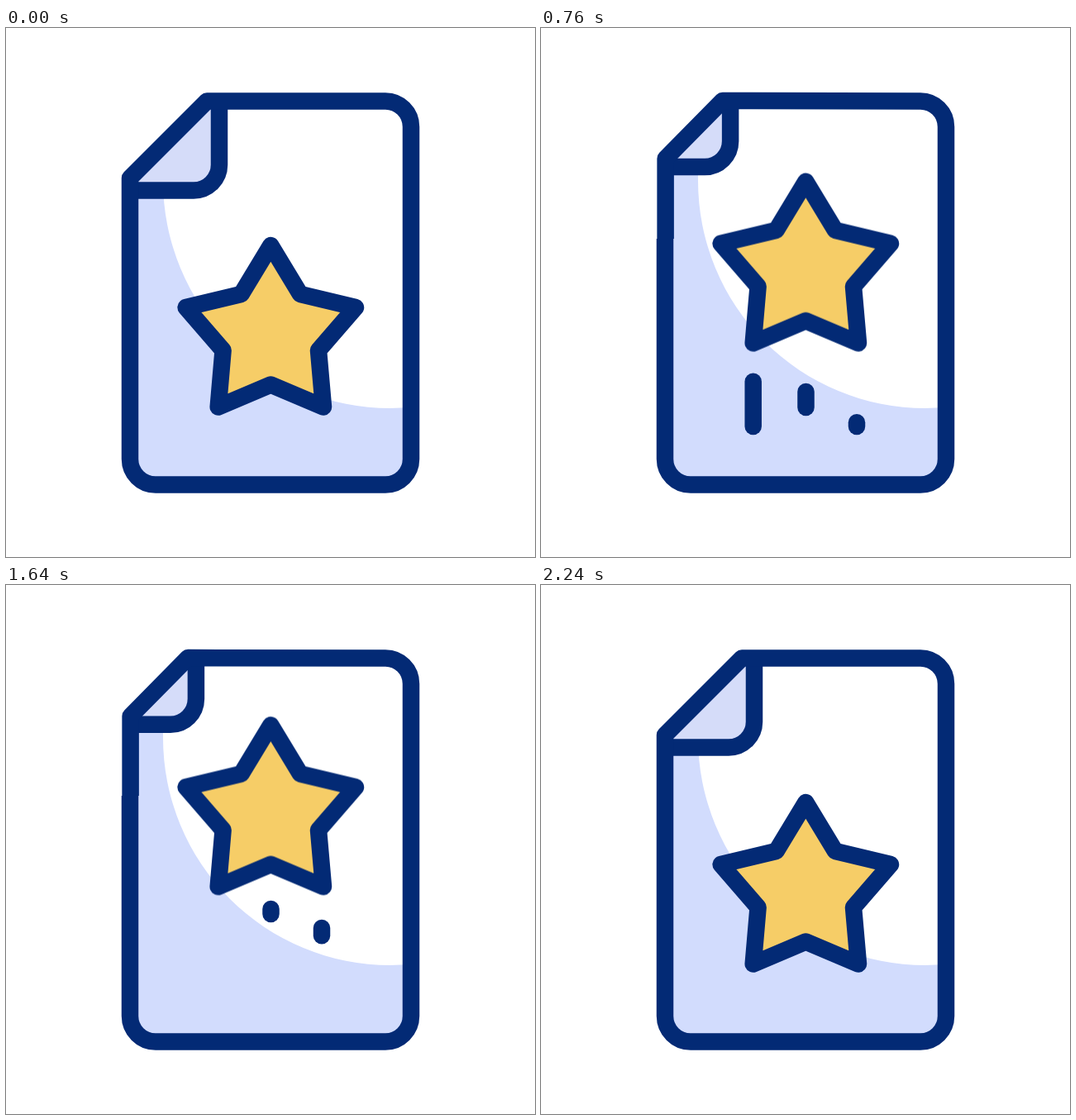
These frames come from a looping animation (640x640 px, 2.4 s). An HTML page without scripts:

```html
<!DOCTYPE html>
<html lang="en">
<head>
<meta charset="utf-8">
<title>Starred document</title>
<style>
  html, body { margin: 0; width: 100%; height: 100%; overflow: hidden; background: #fff; }
  svg { display: block; width: 100%; height: 100%; }

  .line { fill: none; stroke: #032a75; stroke-width: 20.5; stroke-linejoin: round; }
  .shade { fill: #d2dcfd; }
  .flap { fill: #d5dcf9; }
  .star { fill: #f6cd67; }
  .trail { stroke-linecap: round; stroke-dasharray: 67 200; }

  .edge, .flap, .crease, .star { animation: 2.4s cubic-bezier(.75, 0, .25, 1) infinite; }
  .edge { animation-name: edge; }
  .flap { animation-name: flap; }
  .crease { animation-name: crease; }
  .star { animation-name: lift; }

  .trail { animation: 2.4s cubic-bezier(.43, 0, .28, 1) infinite; }
  .t1 { animation-name: trail1; }
  .t2 { animation-name: trail2; }
  .t3 { animation-name: trail3; }

  /* folded corner: large at rest, smaller while the star is up */
  @keyframes edge {
    0%, 11.25%, 88.13%, 100% { d: path("M150 255V521.5A31 31 0 0 0 181 552.5H459A31 31 0 0 0 490 521.5V119.5A31 31 0 0 0 459 88.5L243 88.5L150 181.5L150 255"); }
    41.67%, 57.71% { d: path("M150 255V521.5A31 31 0 0 0 181 552.5H459A31 31 0 0 0 490 521.5V119.5A31 31 0 0 0 459 88.5L216.7 88L150.7 155L150.7 255"); }
  }
  @keyframes flap {
    0%, 11.25%, 88.13%, 100% { d: path("M243 88.5L258 88.5L258 165.5A31 31 0 0 1 227 196.5L150 196.5L150 181.5Z"); }
    41.67%, 57.71% { d: path("M216.7 88L225.5 88L225.5 133.5A31 31 0 0 1 194.5 164.5L150.7 164.5L150.7 155Z"); }
  }
  @keyframes crease {
    0%, 11.25%, 88.13%, 100% { d: path("M258 88.5L258 165.5A31 31 0 0 1 227 196.5L150 196.5"); }
    41.67%, 57.71% { d: path("M225.5 88L225.5 133.5A31 31 0 0 1 194.5 164.5L150.7 164.5"); }
  }

  @keyframes lift {
    0%, 11.46% { transform: translateY(0); }
    46.46% { transform: translateY(-103px); }
    57.08% { transform: translateY(-103px); animation-timing-function: cubic-bezier(.8, 0, .1, 1); }
    93.33%, 100% { transform: translateY(0); }
  }

  /* trails grow upwards, then vanish from the bottom */
  @keyframes trail1 {
    0%, 20.32% { stroke-dashoffset: 67; opacity: 0; }
    20.33% { stroke-dashoffset: 67; opacity: 1; }
    40.33%, 51.67% { stroke-dashoffset: 0; opacity: 1; }
    68.33% { stroke-dashoffset: -67; opacity: 1; }
    68.34%, 100% { stroke-dashoffset: -67; opacity: 0; }
  }
  @keyframes trail2 {
    0%, 25.66% { stroke-dashoffset: 67; opacity: 0; }
    25.67% { stroke-dashoffset: 67; opacity: 1; }
    45.67%, 58.17% { stroke-dashoffset: 0; opacity: 1; }
    73.17% { stroke-dashoffset: -67; opacity: 1; }
    73.18%, 100% { stroke-dashoffset: -67; opacity: 0; }
  }
  @keyframes trail3 {
    0%, 28.32% { stroke-dashoffset: 67; opacity: 0; }
    28.33% { stroke-dashoffset: 67; opacity: 1; }
    48.33%, 60.63% { stroke-dashoffset: 0; opacity: 1; }
    73.13% { stroke-dashoffset: -67; opacity: 1; }
    73.14%, 100% { stroke-dashoffset: -67; opacity: 0; }
  }
</style>
</head>
<body>
<svg viewBox="0 0 640 640">
  <path class="shade" d="M150 186L168 165H190V185A275 275 0 0 0 465 460L490 459V521.5A31 31 0 0 1 459 552.5H181A31 31 0 0 1 150 521.5Z"/>
  <path class="flap" d="M243 88.5L258 88.5L258 165.5A31 31 0 0 1 227 196.5L150 196.5L150 181.5Z"/>
  <path class="line crease" d="M258 88.5L258 165.5A31 31 0 0 1 227 196.5L150 196.5"/>
  <path class="line edge" d="M150 255V521.5A31 31 0 0 0 181 552.5H459A31 31 0 0 0 490 521.5V119.5A31 31 0 0 0 459 88.5L243 88.5L150 181.5L150 255"/>
  <path class="line trail t1" d="M256.7 482V415"/>
  <path class="line trail t2" d="M320.5 459V392"/>
  <path class="line trail t3" d="M382 482V415"/>
  <path class="line star" style="fill:#f6cd67" d="M320.3 263L356 322L423 338L378 390L384 458.5L320.3 431.5L256.7 458.5L262.6 390L217.6 338L284.6 322Z"/>
</svg>
</body>
</html>
```
